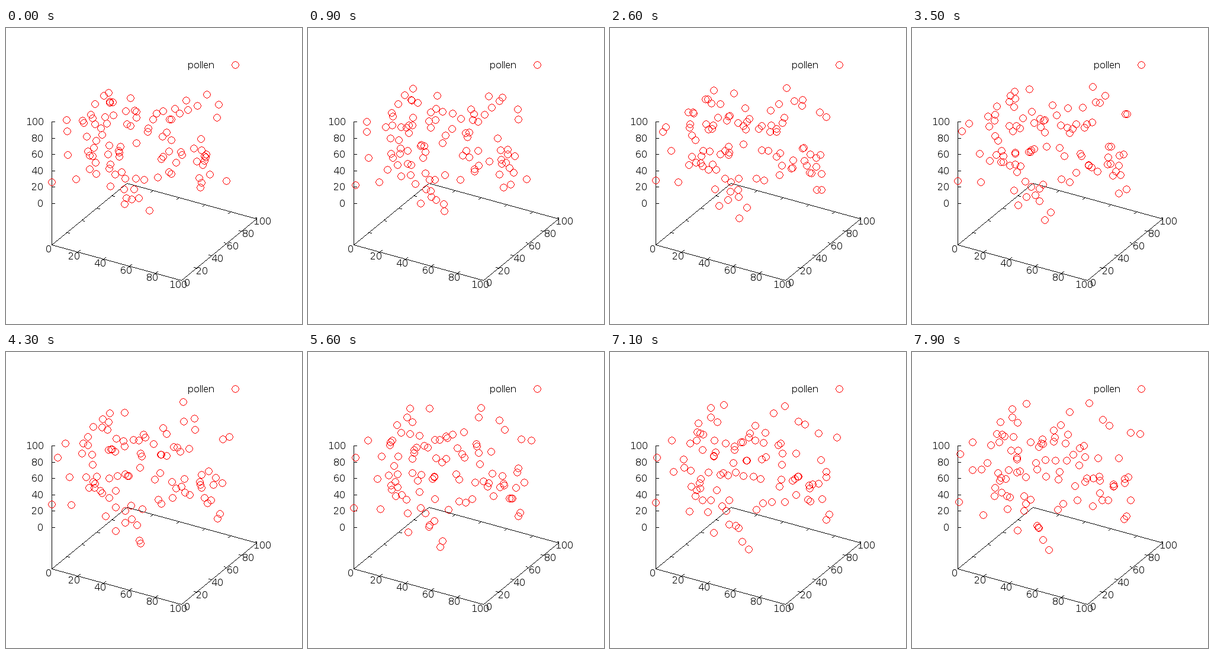
A matplotlib script for the animation above (8 s loop, 500x500 px).

```python
import numpy as np
import matplotlib.pyplot as plt
from matplotlib.animation import FuncAnimation

SIZE, FRAMES, STEP_MS = 500, 80, 100
GRAINS, RADIUS, STEP = 100, 5.7, 1.5
BLACK, RED = (0, 0, 0), (255, 0, 0)

# Oblique view: pixels per data unit along x, y and z
VIEW = np.array([(2.19, 0.60), (1.27, -1.04), (0, -1.38)])
FLOOR = np.array([77, 366])   # corner of the base plane
ZERO = np.array([77, 296])    # screen position of (0, 0, 0)
CLOUD = np.array([40, 48, 53])

# Hinted glyphs with whole-pixel advances
plt.rcParams["text.hinting"] = "native"
plt.rcParams["text.hinting_factor"] = 1

fig = plt.figure(figsize=(SIZE / 100, SIZE / 100), dpi=100, facecolor="white")
ax = fig.add_axes([0, 0, 1, 1])
ax.axis("off")
backdrop = np.full((SIZE, SIZE, 3), 255, np.uint8)


def line(start, end):
    """One-pixel line without smoothing."""
    start, end = np.rint(start), np.rint(end)
    n = int(np.abs(end - start).max()) + 1
    x, y = np.rint(np.linspace(start, end, n)).astype(int).T
    backdrop[y, x] = BLACK


def label(x, y, text, ha="center"):
    ax.text(x, y + 5.5, text, ha=ha, va="baseline", fontsize=11.52,
            family="DejaVu Sans", color="black")


def ring_offsets():
    a = np.linspace(0, 2 * np.pi, 120)
    ring = np.stack([np.cos(a), np.sin(a)], axis=1) * RADIUS
    return np.unique(np.rint(ring).astype(int), axis=0)


def stamp(img, centres):
    """Draw a red ring around each centre."""
    pixels = np.rint(centres).astype(int)[:, None] + RING
    x, y = np.clip(pixels.reshape(-1, 2), 0, SIZE - 1).T
    img[y, x] = RED


def draw_axes():
    ex, ey = VIEW[0] * 100, VIEW[1] * 100
    tick_x, tick_y = VIEW[0] * 2, VIEW[1] * 3
    for edge, other in ((ex, ey), (ey, ex)):
        line(FLOOR, FLOOR + edge)
        line(FLOOR + other, FLOOR + ex + ey)
    line(ZERO + VIEW[2] * 100, FLOOR)

    for v in range(0, 101, 20):
        z = ZERO + VIEW[2] * v
        line(z, z + (5, 0))
        label(63, round(z[1]), v, "right")

        on_x, on_y = FLOOR + VIEW[0] * v, FLOOR + VIEW[1] * v
        label(*np.rint(on_x + (-6, 7)), v)
        label(*np.rint(on_y + ex + (10, 4.5)), v)
        if 0 < v < 100:
            line(on_x, on_x + tick_y)
            line(on_x + ey, on_x + ey - tick_y)
            line(on_y, on_y + tick_x)
            line(on_y + ex, on_y + ex - tick_x)


def brownian_paths():
    """Grains spread evenly in a cube, each on its own 3D random walk."""
    rng = np.random.default_rng(7)
    start = rng.uniform(-48, 48, (GRAINS, 3))
    start += CLOUD - start.mean(axis=0)
    steps = rng.uniform(-STEP, STEP, (FRAMES, GRAINS, 3))
    steps[0] = 0
    walk = np.clip(start + steps.cumsum(axis=0), 0, 100)
    return ZERO + walk @ VIEW


RING = ring_offsets()
paths = brownian_paths()
draw_axes()
label(351, 62, "pollen", "right")
stamp(backdrop, np.array([(387, 62)]))
stage = ax.imshow(backdrop, interpolation="nearest", aspect="auto")


def update(i):
    img = backdrop.copy()
    stamp(img, paths[i])
    stage.set_data(img)
    return (stage,)


anim = FuncAnimation(fig, update, frames=FRAMES, interval=STEP_MS,
                     repeat=True, repeat_delay=0, blit=False)
plt.show()
```
